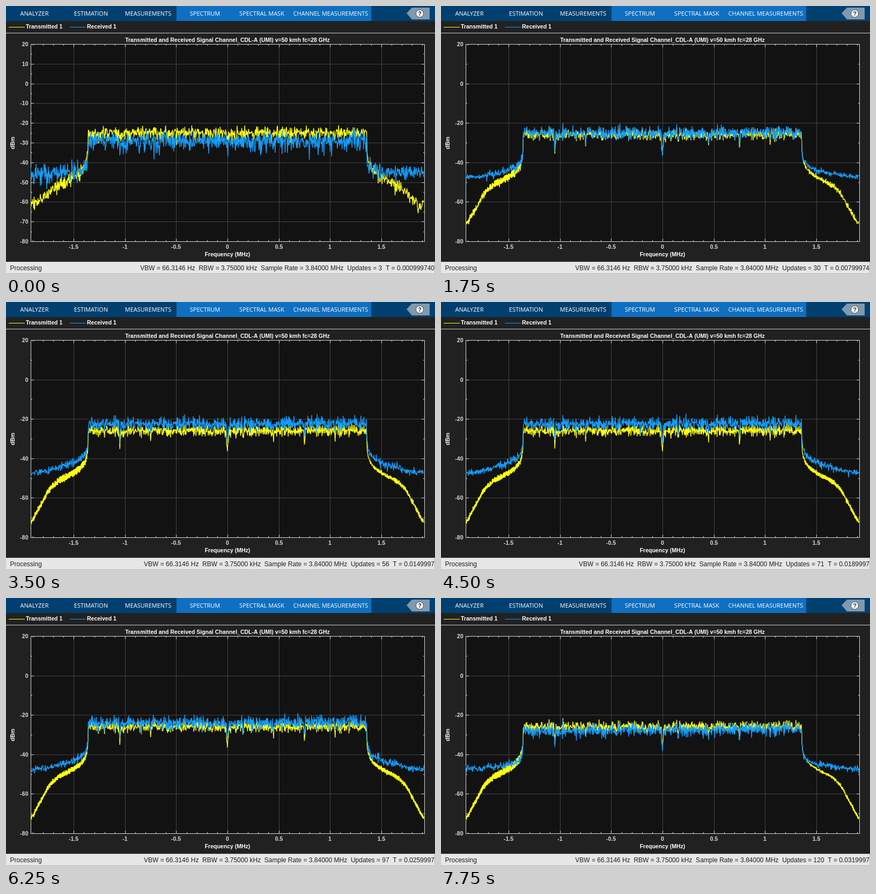
These frames come from a looping animation (800 by 500 pixels, 8000 ms). An HTML page with a canvas:

```html
<!DOCTYPE html>
<html lang="en">
<head>
<meta charset="utf-8">
<title>Spectrum analyzer</title>
<style>
  html, body { margin: 0; width: 100%; height: 100%; overflow: hidden; background: #212121; }
  canvas { display: block; }
</style>
</head>
<body>
<canvas id="stage" width="800" height="500"></canvas>
<script>
const ctx = document.getElementById('stage').getContext('2d');
const STEP = 250, STEPS = 32, BINS = 1024;
const PLOT = { left: 46, right: 780, top: 71, bottom: 439, mid: 413 };
const PX_PER_MHZ = 367 / 1.92, PX_PER_DB = 3.68;
const YELLOW = '#ffff11', BLUE = '#139fff', LIGHT = '#d9d9d9';
const BOLD = 'bold 10.5px "Liberation Sans", Arial, sans-serif';
const PLAIN = '12px "Liberation Sans", Arial, sans-serif';
const MENU = '11px "Open Sans", "Noto Sans", sans-serif';

const xOf = mhz => PLOT.mid + mhz * PX_PER_MHZ;
const yOf = db => PLOT.top + (20 - db) * PX_PER_DB;
const toDb = p => 10 * Math.log10(p);
const addDb = (a, b) => toDb(10 ** (a / 10) + 10 ** (b / 10));

function seeded(seed) {
  return () => {
    seed = (seed + 0x6D2B79F5) | 0;
    let t = Math.imul(seed ^ (seed >>> 15), 1 | seed);
    t = (t + Math.imul(t ^ (t >>> 7), 61 | t)) ^ t;
    return ((t ^ (t >>> 14)) >>> 0) / 4294967296;
  };
}

// Linear interpolation in rows of [position, value, ...]
function lookup(rows, pos, col = 1) {
  let i = 1;
  while (i < rows.length - 1 && rows[i][0] < pos) i++;
  const a = rows[i - 1], b = rows[i];
  const t = Math.min(1, Math.max(0, (pos - a[0]) / (b[0] - a[0])));
  return a[col] + (b[col] - a[col]) * t;
}

// Level outside the band by pixels from the outer plot edge
const BAND_EDGE = 107;
const SKIRT = [[0, -73], [5, -71], [14, -66], [24, -61], [34, -56], [44, -53], [54, -51],
  [64, -49.7], [74, -48.2], [84, -46.5], [94, -44.5], [101, -42], [105, -39], [107, -34]];
const TX_LEVEL = [[0, -24.6], [4, -25.5], [10, -25.9]];
// step, received level at the left and right of the band
const RX_LEVEL = [[0, -28.7, -28.7], [4, -26.9, -26.7], [10, -23.3, -23], [14, -22.4, -22],
  [18, -22.5, -21.9], [25, -24, -23.5], [31, -28.4, -26.7]];
const TX_FLOOR = [[0, -61], [4, -73], [10, -79], [14, -83]];
const RX_FLOOR = [[0, -45], [4, -47.1], [31, -47.1]];
// MHz, depth in dB, width in bins
const DIPS = [[-1.05, 7, 1.4], [-0.75, 4, 1.4], [-0.45, 2, 1.4], [-0.15, 3, 1.4], [0, 10, 2.6],
  [0.15, 4.5, 1.4], [0.45, 5, 1.4], [0.75, 7.5, 1.4], [1.05, 3.5, 1.4]];

const updatesAt = step => Math.floor(3.75 * (step + 1));
const freqOf = bin => (bin - BINS / 2) * 0.00375;
const alternate = bin => (bin % 2 ? 1 : -1);

const ripple = (() => {
  const rnd = seeded(71);
  return Array.from({ length: BINS }, (_, bin) => {
    const noise = (rnd() + rnd() + rnd() - 1.5) * 1.8 + alternate(bin) * 2 * rnd();
    return DIPS.reduce((sum, [f, depth, width]) =>
      sum - depth * Math.exp(-(((freqOf(bin) - f) / 0.00375 / width) ** 2)), noise);
  });
})();

// Running power average of exponential noise, in dB, for every step
function averagedNoise(seed, memory, scale) {
  const rnd = seeded(seed), mean = new Float32Array(BINS);
  let count = 0;
  return Array.from({ length: STEPS }, (_, step) => {
    while (count < updatesAt(step)) {
      count++;
      const weight = 1 / Math.min(count, memory);
      for (let i = 0; i < BINS; i++) mean[i] += (-Math.log(1 - rnd()) - mean[i]) * weight;
    }
    return mean.map(p => toDb(p) * scale);
  });
}
const txNoise = averagedNoise(11, 50, 0.6), rxNoise = averagedNoise(29, 10, 0.9);

function spectra(step) {
  const tx = [], rx = [];
  const txFloor = lookup(TX_FLOOR, step), rxFloor = lookup(RX_FLOOR, step);
  const txLevel = lookup(TX_LEVEL, step);
  const gainLeft = lookup(RX_LEVEL, step, 1) - txLevel;
  const gainRight = lookup(RX_LEVEL, step, 2) - txLevel;
  const settled = 0.4 + 0.6 * Math.min(1, step / 4);
  for (let i = 0; i < BINS; i++) {
    const edge = 367 - Math.abs(freqOf(i)) * PX_PER_MHZ;
    const swell = Math.abs(Math.cos(i * 0.006 + step * 0.9)) + (i < BINS / 2 ? edge / BAND_EDGE : 0);
    const base = edge > BAND_EDGE
      ? txLevel + ripple[i] * settled
      : lookup(SKIRT, edge) + alternate(i) * swell;
    const gain = gainLeft + (gainRight - gainLeft) * i / BINS;
    tx.push(addDb(base, txFloor) + txNoise[step][i]);
    rx.push(addDb(base + gain, rxFloor) + rxNoise[step][i]);
  }
  return { tx, rx };
}
const traces = Array.from({ length: STEPS }, (_, step) => spectra(step));

function rect(color, x, y, w, h) {
  ctx.fillStyle = color;
  ctx.fillRect(x, y, w, h);
}

function text(str, x, y, font, color, align = 'left') {
  ctx.font = font;
  ctx.fillStyle = color;
  ctx.textAlign = align;
  ctx.fillText(str, x, y);
}

function drawToolbar() {
  rect('#004070', 0, 0, 800, 28);
  rect('#0f6fc0', 318, 0, 363, 28);
  [['ANALYZER', 53], ['ESTIMATION', 158.5], ['MEASUREMENTS', 265], ['SPECTRUM', 371],
    ['SPECTRAL MASK', 477], ['CHANNEL MEASUREMENTS', 605.5]]
    .forEach(([label, x]) => text(label, x, 18, MENU, '#fff', 'center'));

  ctx.fillStyle = '#8099ae';
  ctx.beginPath();
  [[747, 13.5], [757, 3], [790, 3], [790, 25], [757, 25]].forEach(p => ctx.lineTo(...p));
  ctx.fill();
  ctx.beginPath();
  ctx.arc(771.5, 14, 7, 0, 7);
  ctx.fillStyle = '#f6f6f6';
  ctx.fill();
  ctx.strokeStyle = '#41505e';
  ctx.lineWidth = 1;
  ctx.stroke();
  text('?', 771.5, 18, 'bold 11px "Liberation Sans", sans-serif', '#26313b', 'center');
}

function drawLegend() {
  rect(YELLOW, 5, 39, 30, 1);
  rect(BLUE, 119, 39, 30, 1);
  text('Transmitted 1', 37, 42, BOLD, '#fff');
  text('Received 1', 151, 42, BOLD, '#fff');
  rect('#d0d0d0', 0, 50, 800, 1);
}

function tickX(x, len) {
  rect(LIGHT, x, PLOT.top, 1, len);
  rect(LIGHT, x, PLOT.bottom + 1 - len, 1, len);
}

function tickY(y, len) {
  rect(LIGHT, PLOT.left, y, len, 1);
  rect(LIGHT, PLOT.right + 1 - len, y, len, 1);
}

function drawAxes(spacing) {
  const { left, right, top, bottom } = PLOT;
  rect('#121212', left, top, right - left, bottom - top);

  for (let n = -19; n <= 19; n++) {
    const x = Math.round(xOf(n / 10));
    if (n % 5 === 0) {
      rect('#444', x, top, 1, bottom - top);
      text(String(n / 10), x, 453, BOLD, LIGHT, 'center');
    }
    tickX(x, n % 5 ? 3 : 6);
  }
  for (let db = 20; db >= -80; db -= spacing / 2) {
    const y = Math.round(yOf(db)), major = (20 - db) % spacing === 0;
    if (major) {
      rect('#444', left, y, right - left, 1);
      text(String(db), 41.5, y + 4, BOLD, LIGHT, 'right');
    }
    tickY(y, major ? 6 : 3);
  }
  ctx.strokeStyle = LIGHT;
  ctx.lineWidth = 1;
  ctx.strokeRect(left + 0.5, top + 0.5, right - left, bottom - top);

  text('Transmitted and Received Signal Channel_CDL-A (UMI) v=50 kmh fc=28 GHz',
    PLOT.mid, 67, BOLD, '#fff', 'center');
  text('Frequency (MHz)', PLOT.mid, 467, BOLD, '#fff', 'center');
  ctx.save();
  ctx.translate(16, 255.5);
  ctx.rotate(-Math.PI / 2);
  text('dBm', 0, 0, BOLD, '#fff', 'center');
  ctx.restore();
}

function drawTrace(levels, color) {
  ctx.strokeStyle = color;
  ctx.lineWidth = 1.4;
  ctx.lineJoin = 'bevel';
  ctx.beginPath();
  levels.forEach((db, i) => ctx.lineTo(xOf(freqOf(i)), yOf(db)));
  ctx.stroke();
}

function drawStatus(step) {
  rect('#b4b4b4', 0, 477, 800, 23);
  rect('#e8e6e8', 0, 478, 799, 21);
  const seconds = ((step + 1) * 0.001 - 2.6e-7).toPrecision(6);
  text('Processing', 7.5, 493, PLAIN, '#202020');
  text('VBW = 66.3146 Hz  RBW = 3.75000 kHz  Sample Rate = 3.84000 MHz  ' +
    `Updates = ${updatesAt(step)}  T = ${seconds}`, 799, 493, PLAIN, '#202020', 'right');
}

function draw() {
  const step = Math.floor(performance.now() / STEP) % STEPS;
  rect('#212121', 0, 0, 800, 500);
  drawToolbar();
  drawLegend();
  drawAxes(step ? 20 : 10);
  ctx.save();
  ctx.beginPath();
  ctx.rect(PLOT.left, PLOT.top, PLOT.right - PLOT.left + 1, PLOT.bottom - PLOT.top);
  ctx.clip();
  drawTrace(traces[step].tx, YELLOW);
  drawTrace(traces[step].rx, BLUE);
  ctx.restore();
  drawStatus(step);
  requestAnimationFrame(draw);
}
draw();
</script>
</body>
</html>
```
